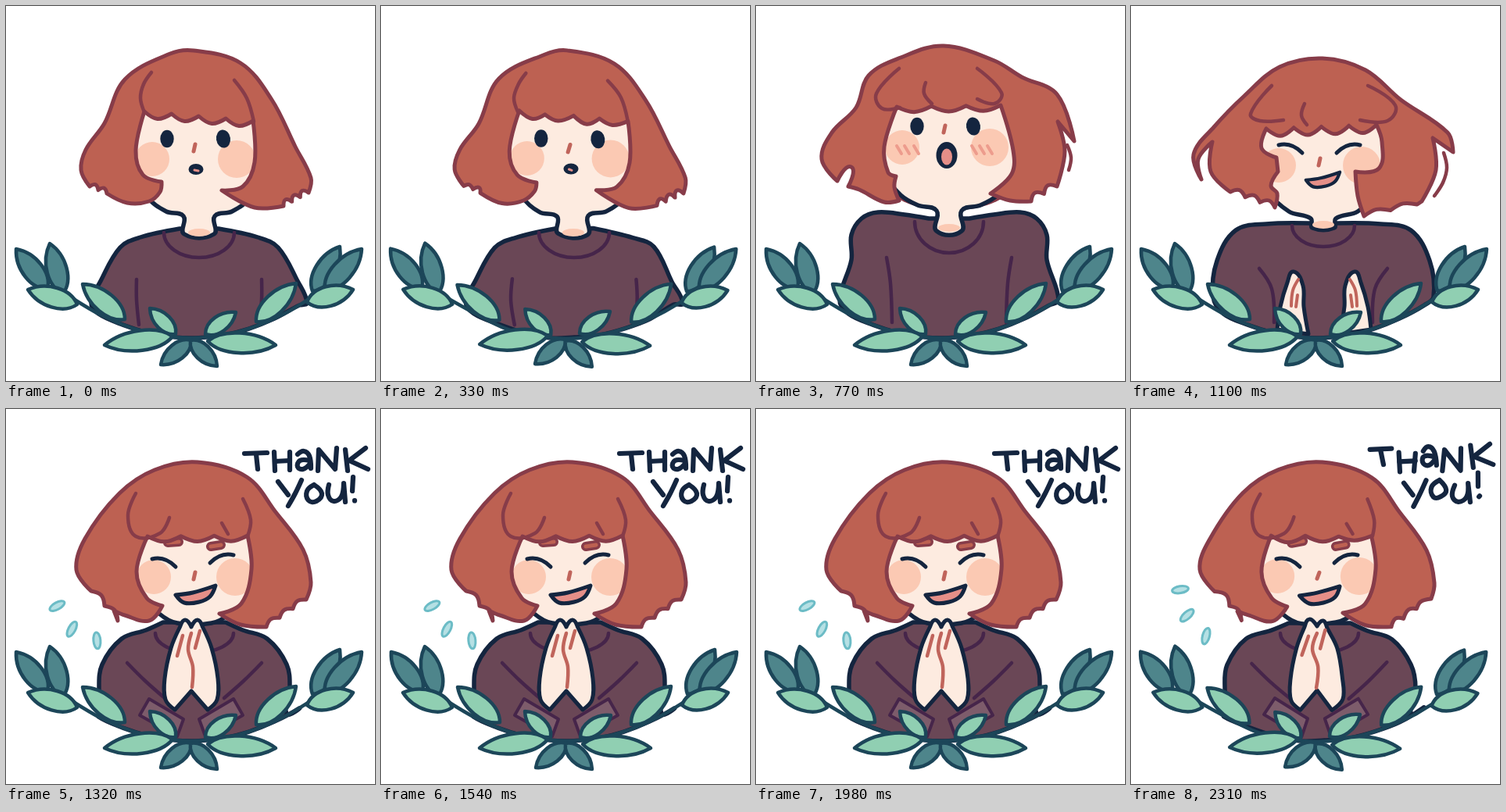
Animation, 472 px wide and 480 px high, one loop 2.42 s. Source, as an HTML page:

```html
<!DOCTYPE html>
<html lang="en">
<head>
<meta charset="utf-8">
<title>Thank you</title>
<style>
html, body { margin: 0; width: 100%; height: 100%; overflow: hidden; background: #fff; }
svg { display: block; width: 100vw; height: 100vh; }
</style>
</head>
<body>
<svg id="stage" viewBox="0 0 472 480" role="img" aria-label="Thank you!" stroke-linecap="round" stroke-linejoin="round"></svg>
<script>
const HAIR = '#bd6152', MAROON = '#873c49', NAVY = '#14253f', SKIN = '#fdebe0', CHEEK = '#fbc9b3',
  PINK = '#e58f88', RED = '#c0645b', SHIRT = '#6a4756', PLUM = '#46254a', CUFF = '#7d5c6b',
  DARK = '#4e858b', LIGHT = '#90cfb2', STEM = '#1c4659';
const STEP = 110, LOOP = 2420;
const stage = document.getElementById('stage');
let boil = 0;

// Redrawn frames shift each point a little, by position.
const wobble = (x, y) => [x + boil * Math.sin(x * 1.7 + y * 2.3), y + boil * Math.sin(x * 2.9 - y * 1.3)];

// Smooth curve through points; "!" marks a sharp corner.
function curve(text, closed) {
  const pts = text.trim().split(/\s+/).map(s => ({ p: wobble(...s.replace('!', '').split(',').map(Number)), sharp: s.endsWith('!') }));
  const n = pts.length, at = i => pts[(i + n) % n];
  const dir = i => {
    if (at(i).sharp || (!closed && i % (n - 1) === 0)) return [0, 0];
    const a = at(i - 1).p, b = at(i + 1).p, d = Math.hypot(b[0] - a[0], b[1] - a[1]) || 1;
    return [(b[0] - a[0]) / d, (b[1] - a[1]) / d];
  };
  let d = 'M' + at(0).p;
  for (let i = 0; i < (closed ? n : n - 1); i++) {
    const a = at(i).p, b = at(i + 1).p, u = dir(i), v = dir(i + 1);
    const r = Math.hypot(b[0] - a[0], b[1] - a[1]) * 0.35;
    d += `C${a[0] + u[0] * r} ${a[1] + u[1] * r} ${b[0] - v[0] * r} ${b[1] - v[1] * r} ${b}`;
  }
  return closed ? d + 'Z' : d;
}
const path = (d, fill, color, w = 5) => `<path d="${d}" fill="${fill}" stroke="${color}" stroke-width="${w}"/>`;
const shape = (text, fill, color, w) => path(curve(text, true), fill, color, w);
const lines = (list, color, w) => list.map(t => path(curve(t), 'none', color, w)).join('');
function oval(x, y, rx, ry, fill, turn = 0, color = 'none') {
  const [a, b] = wobble(x, y);
  return `<ellipse cx="${a}" cy="${b}" rx="${rx}" ry="${ry}" fill="${fill}" stroke="${color}" stroke-width="3" transform="rotate(${turn} ${a} ${b})"/>`;
}
const group = (x, y, body, scale = 1) => `<g transform="translate(${x} ${y}) scale(${scale})">${body}</g>`;

// A half profile gives "distance from the axis, y"; it is set on both sides.
function both(axis, half) {
  return [-1, 1].map(side => half.replace(/([\d.]+),/g, (_, d) => axis + side * d + ','));
}
function whole(axis, half) {
  const [left, right] = both(axis, half);
  return left.split(' ').reverse().join(' ') + ' ' + right;
}

// Locks of hair: sharp points along a line, rounded between them by depth.
function locks([x0, y0], [x1, y1], n, depth) {
  const dx = x1 - x0, dy = y1 - y0, len = Math.hypot(dx, dy), out = [];
  for (let i = 0; i <= 2 * n; i++) {
    const k = i / (2 * n), off = i % 2 ? depth / len : 0;
    out.push(`${x0 + dx * k - dy * off},${y0 + dy * k + dx * off}${i % 2 ? '' : '!'}`);
  }
  return out.join(' ');
}

const stemY = x => 425 - 0.0022 * (x - 237) ** 2;
function stem(from, to) {
  return Array.from({ length: 9 }, (_, i) => from + (to - from) * i / 8).map(x => `${x},${stemY(x)}`).join(' ');
}

function awake(x, y, mouth) {
  return oval(x - 36, y, 8.7, 11.3, NAVY) + oval(x + 36, y, 9, 11.5, NAVY, -8) + mouth;
}
function happy(x, y, tilt, mouthX, mouthY, size) {
  const eyes = [-1, 1].map(s => {
    const lift = s > 0 ? tilt : 0;
    return path(`M${x + s * 52} ${y - 3 - lift}Q${x + s * 36} ${y - 7 - lift} ${x + s * 22} ${y + 7 - lift}`, 'none', NAVY);
  });
  return eyes.join('') + group(mouthX, mouthY, shape('-25,1! -3,-2 26,-11! 19,3 5,10 -14,11', PINK, NAVY), size);
}

const poses = {
  calm: {
    axis: 247, skin: '72,125 88,190 66,244 42,263 20,269 19,292', chest: '25,285! 75,296 101,309 126,352 138,380',
    collar: [290, 45, 32], fold: '80,350 80,376 77,408', shade: 290,
    hair: `199,225! 197,238 183,250 155,252 ${locks([129, 240], [107, 231], 2, 5)} 96,210 102,184 126,150 152,94 210,61 240,57
      300,73 340,120 370,180 390,220 ${locks([387, 239], [355, 256], 3, 6)} 318,258 276,236! 303,231 318,200
      ${locks([316, 147], [177, 135], 4, -8)} 166,185 175,216`,
    strands: ['186,85 176,100 172,118 177,136', '292,95 308,118 317,148'],
    cheeks: [241, 196, 54], nose: 177,
    face: () => awake(242, 170, oval(243, 209, 9.5, 7, NAVY) + lines(['241,210 246,211'], PINK, 3))
  },
  gasp: {
    axis: 247, skin: '68,115 88,175 82,215 62,242 40,255 16,262 16,288', chest: '26,272! 57,267 91,264 112,272 125,293 125,325 140,376',
    collar: [276, 44, 40], fold: '80,322 75,355 73,405', shade: 284, back: true,
    hair: `179,218! 177,232 183,249! 164,251 132,235 ${locks([118, 231], [104, 224], 1, 24)} 84,196 97,162 128,130 144,89 185,66 240,51
      305,70 340,91 385,113 407,173! 386,148! 395,186 ${locks([385, 231], [352, 250], 2, 7)} 325,249 300,240! 327,215 329,185
      ${locks([313, 127], [180, 129], 3, -7)} 164,180 169,213`,
    strands: ['183,80 154,112 161,131 184,130', '225,125 215,112 217,98', '283,80 314,111 305,125 283,119', '398,178 403,194 400,210'],
    cheeks: [243, 181, 56], nose: 153,
    face: () => awake(242, 154, oval(244, 191, 13.5, 17, NAVY) + oval(244, 193, 7, 10.5, PINK) +
      [182, 192, 204, 278, 288, 298].map(x => lines([`${x - 2},179 ${x + 4},189`], '#ed9c8d', 4)).join(''))
  },
  cheer: {
    axis: 246, skin: '75,140 86,200 72,236 44,263 16,272 14,284', chest: '19,278! 73,279 112,287 136,326 141,372',
    collar: [281, 40, 27], fold: '82,336 66,362 63,405', shade: 280,
    hair: `188,212! 179,230 187,240 ${locks([184, 258], [127, 238], 3, 6)} 102,212 104,174! 86,196 90,222! 80,190 106,155 145,115 190,78 245,67
      300,82 345,120 405,162 412,187! 386,169! 390,210 372,250! ${locks([366, 254], [298, 269], 2, 5)} 290,243 287,212! 317,208 321,174
      ${locks([314, 152], [173, 157], 4, -10)} 167,182 186,194!`,
    strands: ['180,102 153,138 165,147 195,146', '225,152 218,140 222,125', '303,102 338,127 328,147 293,146', '400,188 404,207 399,226 388,243'],
    cheeks: [242, 204, 53], nose: 195,
    face: () => happy(241, 181, 0, 245, 222, 0.85),
    hands: () => both(247, '20,420! 26,385 27,358 39,340 47,354 56,385 60,414!').map(t => shape(t, SKIN, NAVY)).join('') +
      lines(both(247, '33,350 40,364 42,384').concat(both(247, '34,370 36,385')), RED, 4)
  },
  thanks: {
    axis: 241, skin: '65,150 75,230 45,262 22,274', chest: '40,273! 62,283 93,294 118,327 122,358 118,390',
    collar: [287, 50, 25], fold: '86,325 63,348 38,370',
    hair: `200,252! 183,271 152,264 138,258! ${locks([143, 271], [109, 233], 2, 6)} 90,206 101,166 145,108 190,78 245,68
      308,87 345,132 380,180 390,222 ${locks([384, 244], [333, 279], 3, 5)} 300,276 273,262! 301,249 314,205
      ${locks([309, 162], [181, 163], 3, -7)} 167,208 180,242`,
    strands: ['166,108 156,136 166,163 197,159 209,139', '303,115 313,142 309,163', '276,146 284,160'],
    cheeks: [241, 215, 52], nose: 209,
    face: () => lines(['207,171 221,170', '262,176 275,174'], MAROON, 12) + lines(['207,171 221,170', '262,176 275,174'], HAIR, 5) +
      happy(239, 195, 5, 242, 237, 1),
    hands: () => both(237, '54,371! 10,397! 18,419! 66,392!').map(t => shape(t, CUFF, PLUM, 4)).join('') +
      shape(whole(237, '0,279! 8,270 15,280 26,306 34,345 33,372 21,385! 0,361!'), SKIN, NAVY) +
      lines(['237,287 233,308 239,330 238,356', '248,284 242,306', '226,290 219,316'], RED, 4.5)
  }
};

function leaf([x, y, tipX, tipY], fill) {
  const [a, b] = wobble(x, y), dx = tipX - x, dy = tipY - y, len = Math.hypot(dx, dy);
  const bulge = Math.min(17, 0.28 * len) / len;
  const side = (k, s) => `${a + dx * k - s * dy * bulge} ${b + dy * k + s * dx * bulge}`;
  return path(`M${a} ${b}C${side(0.2, 1)} ${side(0.7, 1)} ${a + dx} ${b + dy}C${side(0.7, -1)} ${side(0.2, -1)} ${a} ${b}Z`, fill, STEM, 4.5);
}
// Leaves: base x, y and tip x, y.
const darkLeaves = [[53, 362, 13, 311], [73, 368, 56, 304], [392, 365, 427, 308], [408, 364, 455, 311], [237, 428, 198, 459], [236, 428, 270, 461]];
const lightLeaves = [[91, 382, 28, 363], [152, 401, 98, 356], [217, 420, 184, 387], [255, 420, 294, 392],
  [320, 404, 371, 355], [385, 379, 444, 363], [213, 423, 126, 434], [258, 429, 345, 434]];
const wreath = () => lines([stem(84, 394)], STEM, 4.5) +
  darkLeaves.map(l => leaf(l, DARK)).join('') + lightLeaves.map(l => leaf(l, LIGHT)).join('');

// Hand lettering, one entry of strokes per letter.
const letters = [
  '305,57 334,56/320,58 322,77', '343,55 344,79/363,55 363,78/344,67 363,66',
  '373,58 381,54 388,60 390,76/388,66 376,66 373,74 380,77 389,70',
  '399,79 400,52! 421,77! 423,50', '434,52 437,79/460,50 439,66! 463,77',
  '348,93 361,110/378,91 370,108 361,124', '394,97 385,105 387,117 397,118 404,108 394,97',
  '413,97 412,110 419,118 429,112 432,95! 434,119', '444,87 443,105/446,117 446,117.5'
];
function greeting(alt) {
  const words = letters.map((t, i) => group(0, alt * (i % 2 ? 1 : -5), lines(t.split('/'), NAVY, 6.2)));
  const drops = [0, 1, 2].map(i => {
    const turn = 164 - 33 * i + 20 * alt, a = turn * Math.PI / 180;
    return oval(125 + 62 * Math.cos(a), 235 + 62 * Math.sin(a), 10.5, 4.5, '#b5e0e4', turn - 13, '#6cbcc6');
  });
  return words.concat(drops).join('');
}

function body(p) {
  const [y, rx, ry] = p.collar;
  return shape(`${whole(p.axis, p.chest)} ${stem(375, 118)}`, SHIRT, NAVY, 5.5) +
    path(`M${p.axis - rx} ${y}A${rx} ${ry} 0 0 0 ${p.axis + rx} ${y}`, 'none', PLUM, 4.5) +
    lines(both(p.axis, p.fold), PLUM, 4.5);
}
function head(p) {
  const [x, y, apart] = p.cheeks;
  return (p.back ? oval(248, 222, 84, 40, MAROON) : '') + shape(whole(p.axis, p.skin), SKIN, NAVY, 5.5) +
    (p.shade ? oval(p.axis, p.shade, 14, 5, CHEEK) : '') +
    oval(x - apart, y, 22, 22, CHEEK) + oval(x + apart, y, 24, 24, CHEEK) +
    lines([`242,${p.nose} 240,${p.nose + 9}`], RED) + p.face() +
    shape(p.hair, HAIR, MAROON) + lines(p.strands, MAROON, 4.5);
}
function draw([name, alt, dy]) {
  const p = poses[name];
  boil = alt;
  stage.innerHTML = body(p) + group(-alt, dy, head(p)) + (p.hands ? p.hands() : '') + wreath() +
    (name === 'thanks' ? greeting(alt) : '');
}

// Pose, drawing and head offset of every step.
function cue(i) {
  if (i < 5) return ['calm', i % 2, 0];
  if (i < 9) return ['gasp', i === 7 ? 0 : i % 2, i === 6 ? -3 : i === 8 ? 5 : 0];
  return i < 11 ? ['cheer', i % 2, i === 9 ? 3 : 0] : ['thanks', i % 2, 0];
}

let shown = -1;
function tick() {
  const step = Math.floor(performance.now() % LOOP / STEP);
  if (step !== shown) draw(cue(shown = step));
  requestAnimationFrame(tick);
}
tick();
</script>
</body>
</html>
```
